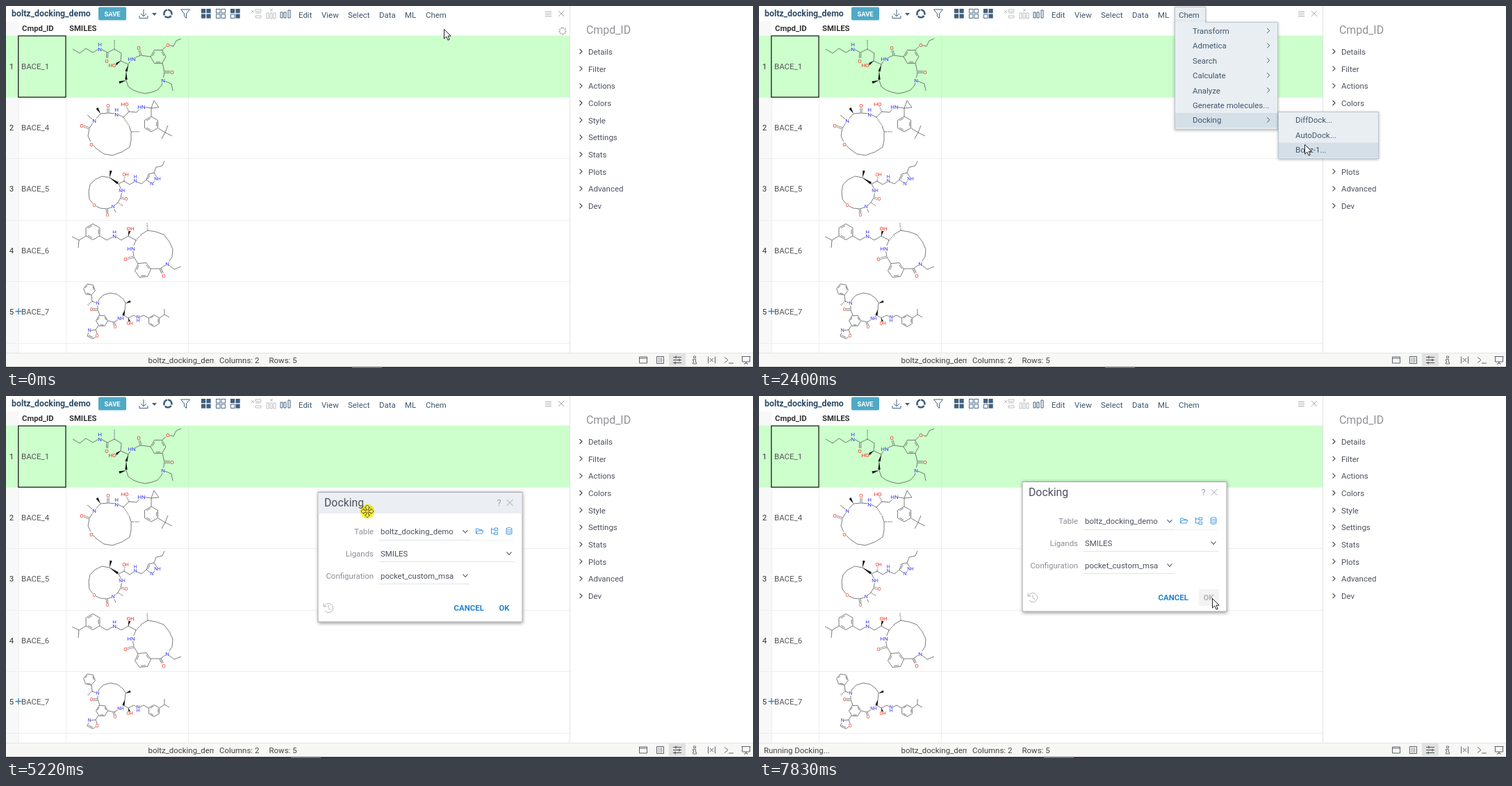
Animation of 1075 by 521 pixels, one loop 8 s. Source, as an HTML page with a canvas:

```html
<!DOCTYPE html>
<html lang="en">
<head>
<meta charset="utf-8">
<title>Docking demo</title>
<style>
html, body { margin: 0; width: 100%; height: 100%; overflow: hidden; background: #fff; }
canvas { display: block; }
</style>
</head>
<body>
<canvas id="stage" width="1075" height="521"></canvas>
<script>
const W = 1075, H = 521, LOOP = 8000;
const INK = '#4d5261', SLATE = '#40566c', BLUE = '#2083d5', GREY = '#9a9ea6', GREEN = '#ccffcc';
const screen = document.getElementById('stage').getContext('2d');
const backdrop = document.createElement('canvas');
backdrop.width = W;
backdrop.height = H;
let g = backdrop.getContext('2d');

function text(s, x, y, color = INK, size = 11.45, weight = 400, align = 'left') {
  g.font = `${weight} ${size}px Roboto, sans-serif`;
  g.textAlign = align;
  g.textBaseline = 'alphabetic';
  g.fillStyle = color;
  g.fillText(s, x, y + size * 0.355);
}
function rect(x, y, w, h, color) {
  g.fillStyle = color;
  g.fillRect(x, y, w, h);
}
function frame(x, y, w, h, color, width = 1) {
  g.strokeStyle = color;
  g.lineWidth = width;
  g.strokeRect(x, y, w, h);
}
function path(d, color, width = 1, fill) {
  const p = new Path2D(d);
  if (fill) { g.fillStyle = fill; g.fill(p); }
  if (color) { g.strokeStyle = color; g.lineWidth = width; g.stroke(p); }
}
// Path drawn around a local origin.
function icon(x, y, d, color, width = 1, fill) {
  g.save();
  g.translate(x, y);
  path(d, color, width, fill);
  g.restore();
}
function shadowBox(x, y, w, h, fill, border, blur, shade) {
  g.save();
  g.shadowColor = shade;
  g.shadowBlur = blur;
  g.shadowOffsetY = 1;
  rect(x, y, w, h, fill);
  g.restore();
  frame(x + 0.5, y + 0.5, w - 1, h - 1, border);
}
const CROSS = 'M-4-4L4 4M4-4L-4 4';
const DOWN = 'M-3.5-2L0 2L3.5-2';

/* ---- molecules ---- */
function hexagon([x, y, r, turn]) {
  const at = (i, k) => {
    const a = (turn + 60 * i) * Math.PI / 180;
    return [x + k * Math.cos(a), y + k * Math.sin(a)];
  };
  let d = '';
  for (let i = 0; i < 6; i++) {
    d += `M${at(i, r)}L${at(i + 1, r)}`;
    if (i % 2) d += `M${at(i + 0.12, r * 0.76)}L${at(i + 0.88, r * 0.76)}`;
  }
  return d;
}
function molecule({ bg = '#fff', size, bonds, double, wedge = [], hash = '', rings, atoms }) {
  const line = '#505050', thin = 0.75;
  path(bonds, line, thin);
  path(double, line, 2.8);
  path(double, bg, 1.4);
  rings.forEach(r => path(hexagon(r), line, thin));
  wedge.forEach(([x, y, u, v]) => {
    const n = Math.hypot(u - x, v - y), dx = (v - y) / n * 1.7, dy = (x - u) / n * 1.7;
    path(`M${x} ${y}L${u + dx} ${v + dy}L${u - dx} ${v - dy}Z`, null, 0, '#111');
  });
  g.setLineDash([0.8, 1.6]);
  path(hash, '#666', 2);
  g.setLineDash([]);
  for (const [s, x, y] of atoms) {
    const w = size * 0.68 * s.length;
    rect(x - w / 2, y - size * 0.48, w, size * 0.96, bg);
    text(s, x, y, /N|^H$/.test(s) ? '#3434f0' : '#f02a1c', size, 400, 'center');
  }
}
const molecules = [
  { bg: GREEN, size: 8,
    bonds: 'M96 62L106 68L115 61L125 67L135 61L146 67L156 62L166 68L165 79L176 84L173 95L173 107L176 116L183 121L191 124L200 126L210 124L218 121L224 114L226 107L228 95L225 82M176 84L181 76L194 71L208 73M165 79L154 85M226 107L238 112L240 122M224 64L233 56L241 58L245 50L252 47',
    double: 'M146 67L145 78M194 71L191 60M228 95L239 95', hash: 'M156 62L156 49',
    wedge: [[176, 85, 173, 94], [173, 95, 173, 106], [173, 107, 163, 110], [165, 79, 158, 84]],
    rings: [[219, 73, 11, 0]],
    atoms: [['H', 135, 55], ['N', 135, 62], ['O', 145, 79], ['HO', 153, 85], ['HN', 181, 76], ['O', 191, 60], ['O', 233, 56], ['O', 239, 95], ['N', 226, 107]] },
  { size: 8,
    bonds: 'M117 157L127 165L136 155L147 154L159 155L169 160L177 152L188 153L195 145L209 147L213 136L220 146L209 147L209 159M219 176L229 182L239 187M233 172L229 182L224 191M180 181L180 193L178 203L167 210L153 215L141 213L131 206L123 198L118 187L120 176L127 165M177 172L180 181',
    double: 'M147 154L147 143M120 176L109 172', wedge: [[136, 155, 131, 147]],
    hash: 'M177 152L173 144M169 160L177 172M181 181L193 181', rings: [[209, 170, 11, 30]],
    atoms: [['N', 127, 165], ['O', 147, 143], ['N', 159, 156], ['H', 159, 149], ['HO', 171, 141], ['HN', 195, 145], ['O', 109, 172], ['O', 123, 199]] },
  { size: 6.6,
    bonds: 'M162 256L149 247L138 245L128 250L121 257L119 267L120 278L127 287L136 291L145 292L154 289L161 283L165 276L167 266L162 256L170 252L178 257L186 252L195 256L202 250L205 242L213 240L218 248L210 256L202 250M204 249L207 243M154 289L158 297M213 240L216 232L225 230L228 223',
    double: 'M145 292L146 300M165 276L173 278', wedge: [[149, 247, 151, 237], [149, 247, 161, 255]],
    hash: 'M170 252L171 245M161 283L169 288', rings: [],
    atoms: [['OH', 172, 243], ['H', 186, 246], ['N', 186, 252], ['NH', 218, 249], ['N', 210, 256], ['NH', 167, 266], ['O', 173, 278], ['N', 154, 289], ['O', 127, 287], ['O', 146, 301]] },
  { size: 8,
    bonds: 'M95 332L105 337L104 348M105 337L115 331M135 331L145 337L156 331L166 337L176 331L187 337L182 349L184 361L190 371M176 331L178 321M194 329L204 323L216 325L227 329L235 339L240 350L239 361L232 371L222 378L208 378M232 371L242 379L252 375',
    double: 'M184 361L173 364M222 378L227 388', wedge: [[176, 331, 178, 323]],
    hash: 'M187 337L195 329M204 323L203 312', rings: [[125, 325, 11.5, 30], [197, 380, 11.5, -5]],
    atoms: [['H', 156, 325], ['N', 156, 331], ['OH', 179, 320], ['HN', 180, 349], ['O', 172, 364], ['N', 232, 371], ['O', 227, 388]] },
  { size: 6.6,
    bonds: 'M123 416L124 425L132 428L134 422L140 416L150 413L160 415L168 421L172 427L171 438L169 445L165 450L155 455L147 453M132 428L132 437L135 445M169 445L176 449L184 445L190 449L198 445L205 449M176 449L178 457M221 449L228 444L228 436M228 444L235 448M133 460L129 466L120 467L117 475L125 479L132 474L129 466M119 474L125 477',
    double: 'M132 437L123 437M155 455L157 462', wedge: [[172, 428, 179, 425], [171, 437, 169, 445], [176, 449, 178, 455]],
    hash: 'M124 425L117 431', rings: [[120, 408, 8.5, 10], [138, 453, 8.5, 0], [213, 453, 8.5, 30]],
    atoms: [['N', 132, 428], ['O', 123, 437], ['NH', 165, 450], ['O', 157, 462], ['OH', 178, 457], ['N', 190, 448], ['H', 190, 453], ['N', 120, 467], ['O', 131, 475]] }
];

/* ---- static screen ---- */
function toolbar() {
  text('boltz_docking_demo', 8, 11, '#2b4a66', 12.3, 700);
  g.beginPath();
  g.roundRect(133, 1.5, 40, 19, 2);
  g.fillStyle = '#50a9c5';
  g.fill();
  text('SAVE', 153, 11.3, '#fff', 9.4, 700, 'center');
  const c = '#40607f';
  icon(198, 11, 'M0-6V4M-4 0L0 4L4 0M-6 3V6.5H6V3', c);
  icon(213.5, 12, 'M-3.5-2H3.5L0 2Z', null, 0, c);
  g.setLineDash([10, 1.6]);
  icon(233, 11, 'M0-5.5A5.5 5.5 0 1 1-.1-5.5', c, 2.6);
  g.setLineDash([]);
  icon(258, 11, 'M-6.5-6H6.5L1.5 0V6.5L-1.5 4V0Z', c);
  const filled = ['1111', '0000', '1101'];
  filled.forEach((cells, n) => {
    for (let i = 0; i < 4; i++) {
      const x = 281.5 + 21 * n + 7.5 * (i % 2), y = 4.5 + 7.5 * (i >> 1);
      if (cells[i] === '1') rect(x - 0.5, y - 0.5, 6.2, 6.2, c);
      else frame(x, y, 5.5, 5.5, c, 0.9);
    }
  });
  icon(360, 11, 'M-1-6H7V-3H-1ZM-1-1H7M-1 3H7V6H-1ZM-7-5L-3-1M-3-5L-7-1', '#b4b7bb', 0.9);
  icon(381, 11, 'M-6-1H-3V7H-6ZM-1-1H2V7H-1ZM4-1H7V7H4ZM-1-7L3-3M3-7L-1-3', '#b4b7bb', 0.9);
  icon(402, 11, 'M-7-2H-4V6H-7ZM-2-2H1V6H-2ZM4-5H7V6H4Z', c);
  [['Edit', 421], ['View', 454], ['Select', 492], ['Data', 537], ['ML', 574], ['Chem', 604]]
    .forEach(([s, x]) => text(s, x, 12.5, SLATE));
  icon(780.5, 11, 'M-4.5-2.5H4.5M-4.5.5H4.5M-4.5 3.5H4.5', '#9b9fa5', 0.9);
  icon(799, 11, CROSS, '#9b9fa5', 0.9);
}
function grid() {
  rect(0, 22, 18, 477, '#f8f8f8');
  text('Cmpd_ID', 23, 32, '#333', 11.3, 700);
  text('SMILES', 91, 32, '#333', 11.3, 700);
  rect(0, 42.5, 811, 88.5, GREEN);
  for (let i = 1; i < 6; i++) rect(0, Math.round(42.6 + 88.4 * i), 811, 1, '#eeeeee');
  for (const x of [18, 86, 262]) {
    rect(x, 43, 1, 88, '#c4f2c4');
    rect(x, 131, 1, 368, '#eeeeee');
  }
  [1, 4, 5, 6, 7].forEach((id, i) => {
    const y = 87 + 88.2 * i;
    text(String(i + 1), 8, y, '#333', 11.45, 400, 'center');
    text('BACE_' + id, 22, y, '#555');
  });
  icon(18, 439.5, 'M-4.5 0H4.5M0-4.5V4.5', '#2f86c8', 1.3);
  frame(17.75, 43, 68.25, 88.25, '#222', 1.3);
  molecules.forEach(molecule);
}
function sidePanel() {
  rect(811, 0, 1, 499, '#e2e2e2');
  text('Cmpd_ID', 835, 34, '#8f9298', 15.9);
  'Details Filter Actions Colors Style Settings Stats Plots Advanced Dev'.split(' ').forEach((s, i) => {
    const y = 66 + 24.67 * i;
    icon(827, y - 0.5, 'M-1.5-3.5L2 0L-1.5 3.5', '#444', 1.1);
    text(s, 838, y, INK);
  });
}
function statusBar() {
  rect(0, 499, W, 20.5, '#f7f7f5');
  rect(0, 499, W, 1, '#e4e4e2');
  rect(0, 519.5, W, 1.5, '#1d1720');
  g.save();
  g.beginPath();
  g.rect(200, 500, 99, 18);
  g.clip();
  text('boltz_docking_demo', 204.5, 509.5, '#444');
  g.restore();
  text('Columns: 2', 307, 509.5, '#444');
  text('Rows: 5', 378.5, 509.5, '#444');
  rect(954, 500, 24, 18, '#e2e2e0');
  const c = '#4f555e';
  icon(917, 509.5, 'M-5.5-4.5H5.5V4.5H-5.5ZM-5.5-2.5H5.5', c, 0.9);
  icon(941.5, 509.5, 'M-5-5H5V5H-5ZM-3-2.5H-1M0-2.5H3M-3 0H-1M0 0H3M-3 2.5H-1M0 2.5H3', c, 0.9);
  icon(966, 509.5, 'M-6-4H6M-6 0H6M-6 4H6M-2-6V-2M3-2V2M-3 2V6', c, 1.1);
  icon(991, 509.5, 'M-1.5-5.5H1.5V-3H-1.5ZM-2.5-1H1.5V3.5H2.5V5.5H-2.5V3.5H-1.5V1H-2.5Z', c, 0.8);
  icon(1015.5, 509.5, 'M-5-5V5M5-5V5M-2.5-2.5L2.5 2.5M2.5-2.5L-2.5 2.5', c, 0.9);
  icon(1040, 509.5, 'M-6-4L-1 0L-6 4M0 4.5H7', c, 0.9);
  icon(1065, 509.5, 'M-6.5-5H6.5M-5.5-5V2.5H5.5V-5M0 2.5V5.5M-3 6L0 4L3 6', c, 0.9);
}
rect(0, 0, W, H, '#fff');
toolbar();
grid();
sidePanel();
statusBar();
g = screen;

/* ---- motion ---- */
// Each move: start, end, number of steps, evenly spaced points.
const cursorMoves = [
  [60, 800, 12, [[630, 33], [622, 21], [618, 15], [619, 20], [626, 60], [634, 96], [640, 122]]],
  [880, 1130, 5, [[640, 122], [648, 135], [648, 143], [648, 150], [647, 156], [646, 158]]],
  [1450, 2190, 12, [[646, 158], [695, 163], [745, 166], [774, 179], [788, 200]]],
  [2320, 2400, 2, [[788, 200], [785, 199]]],
  [3660, 3810, 3, [[785, 199], [823, 199], [831, 202], [834, 204]]],
  [6170, 6940, 12, [[450, 151], [480, 170], [540, 212], [602, 253], [645, 287], [661, 293]]],
  [7020, 7350, 6, [[661, 293], [654, 291], [649, 290], [652, 291]]]
];
const dialogMoves = [
  [4470, 5220, 11, [[763, 177], [757, 181], [735, 185], [695, 180], [645, 172], [596, 164], [550, 155], [510, 145], [482, 137], [463, 132], [453, 135], [449, 138]]],
  [5290, 5770, 8, [[449, 138], [432, 134], [415, 129], [400, 126], [390, 124], [384, 123], [381, 123], [380, 123], [379, 123]]]
];
const presses = [[2850, 2980], [4000, 4270], [4470, 5770], [7550, 7690]];

function locate(moves, t) {
  let spot = moves[0][3][0];
  for (const [start, end, steps, pts] of moves) {
    if (t < start) break;
    const k = Math.floor((Math.min(t, end) - start) / (end - start) * (steps - 1) + 0.1);
    const u = (k + 1) / steps * (pts.length - 1);
    const i = Math.min(Math.floor(u + 1e-6), pts.length - 2), f = u - i;
    spot = [0, 1].map(a => Math.round(pts[i][a] + (pts[i + 1][a] - pts[i][a]) * f));
  }
  return spot;
}

/* ---- moving parts ---- */
const MENU_BG = '#e9eef3', HOVER = '#d5dfe8', EDGE = '#bcc6d0', SHADE = 'rgba(0,0,0,.3)';
function gear() {
  g.setLineDash([2, 1.5]);
  icon(801, 36, 'M0-5A5 5 0 1 1-.1-5', '#b0b0b0', 1.4);
  g.setLineDash([]);
  icon(801, 36, 'M0-4A4 4 0 1 1-.1-4', '#b0b0b0', 0.8);
}
function menu(t, cx, cy) {
  const items = ['Transform', 'Admetica', 'Search', 'Calculate', 'Analyze', 'Generate molecules...', 'Docking'];
  const subOpen = t >= 1060;
  const active = subOpen ? 6 : Math.floor((cy - 25.3) / 21.4);
  shadowBox(598, 1, 45, 24, MENU_BG, EDGE, 3, SHADE);
  shadowBox(598, 23, 149, 155, MENU_BG, EDGE, 4, SHADE);
  rect(599, 22, 43, 3, MENU_BG);
  text('Chem', 604, 12.5, SLATE);
  items.forEach((s, i) => {
    const y = 36 + 21.4 * i;
    if (i === active) rect(599, y - 10.5, 147, 21.4, HOVER);
    text(s, 624, y, SLATE);
    if (i !== 5) icon(733, y - 0.5, 'M-1.8-3.5L1.8 0L-1.8 3.5', SLATE);
  });
  if (!subOpen) return;
  shadowBox(747, 152, 145, 68, MENU_BG, EDGE, 4, SHADE);
  const over = cx >= 747 ? Math.floor((cy - 153.5) / 21.4) : -1;
  ['DiffDock...', 'AutoDock...', 'Boltz-1...'].forEach((s, i) => {
    const y = 164.3 + 21.4 * i;
    if (i === over) rect(748, y - 10.5, 143, 21.4, HOVER);
    text(s, 772, y, SLATE);
  });
}
function dialog(x, y, hover, disabled) {
  g.save();
  g.translate(x, y);
  shadowBox(-0.5, 0, 295, 187.5, '#fff', '#a2a5a9', 5, 'rgba(0,0,0,.45)');
  if (hover) rect(0.5, 1, 293, 30, '#ebeef2');
  text('Docking', 9, 15.5, INK, 15.8);
  text('?', 260.5, 15.5, GREY, 13, 400, 'center');
  icon(276, 15.5, 'M-4.5-4.5L4.5 4.5M4.5-4.5L-4.5 4.5', GREY, 0.9);
  [['Table', 'boltz_docking_demo', 57, 219], ['Ligands', 'SMILES', 88.5, 282], ['Configuration', 'pocket_custom_msa', 120.5, 219]]
    .forEach(([label, value, cy, right]) => {
      text(label, 80, cy, '#8b8f98', 11.45, 400, 'right');
      text(value, 90, cy, INK);
      rect(87, Math.round(cy + 11.5), right - 87, 1, '#e2e4e7');
      icon(right - 7, cy, DOWN, '#444a55', 1.1);
    });
  rect(219, 69, 63, 1, '#f0f1f3');
  icon(232.5, 56.5, 'M-5 3.5V-3.5H-1.5L-.5-2H3.5V-.5M-5 3.5L-3-.5H5.5L3.5 3.5Z', BLUE, 0.8);
  icon(254, 56.5, 'M-4.5-5V3.5H0M-4.5-2.5H0M0-4.5H4.5V-1H0ZM0 1.5H4.5V5H0Z', BLUE, 0.8);
  icon(275, 56.5, 'M-4-3.5A4 1.5 0 0 1 4-3.5V3.5A4 1.5 0 0 1-4 3.5ZM-4-3.5A4 1.5 0 0 0 4-3.5M-4-1A4 1.5 0 0 0 4-1M-4 1.5A4 1.5 0 0 0 4 1.5', BLUE, 0.7);
  icon(15, 167, 'M-6-2A6.5 6.5 0 1 1-5 4M-7-6.5V-2H-2.5M0-4V.5L3 2.5', '#a9adb3', 0.9);
  text('CANCEL', 195.5, 167, BLUE, 11.45, 700);
  if (disabled) rect(254, 155, 29, 24, '#f3f3f3');
  text('OK', 268, 167, disabled ? '#b4b4b4' : BLUE, 11.45, 700, 'center');
  g.restore();
}
function cursor(kind, x, y) {
  if (kind === 'move') {
    g.save();
    g.translate(x, y);
    for (let i = 0; i < 4; i++) {
      path('M0-9L4-5.2H1.6V-2.2H-1.6V-5.2H-4Z', '#505050', 0.8, '#fff');
      g.rotate(Math.PI / 2);
    }
    g.restore();
  } else if (kind === 'hand') {
    icon(x, y, 'M-1.5 10V1Q0-1 1.5 1V6L7 7.5Q9 8 8.5 11L7 17H-.5L-5.5 11Q-6 8.5-3.5 9Z', '#222', 1, '#fff');
  } else {
    icon(x, y, 'M.5.5V14L3.7 11L6 16.2L8.2 15.2L6 10.2H10.2Z', '#222', 1, '#fff');
  }
}
// The click highlight tints whatever lies under it, pointer included.
function highlight(x, y) {
  g.save();
  g.globalCompositeOperation = 'multiply';
  g.beginPath();
  g.arc(x, y, 10.3, 0, 7);
  g.fillStyle = '#fbf23c';
  g.fill();
  g.restore();
}

function draw(t) {
  const [dx, dy] = locate(dialogMoves, t);
  const dragging = t >= 4470 && t < 6170;
  const lag = t >= 4540 && t < 5150 ? 9 : 0;
  const [cx, cy] = dragging ? [dx + 71 - lag, dy + 28] : locate(cursorMoves, t);
  const hasMenu = t >= 340 && t < 3130, hasDialog = t >= 3330, disabled = t >= 7760;
  const inHeader = hasDialog && cy < dy + 31;
  const onOk = hasDialog && !disabled && cx >= dx + 254 && cy >= dy + 155;

  g.drawImage(backdrop, 0, 0);
  rect(t < 2910 ? 498 : 410, 519.5, 43, 1.5, '#77727a');
  if (!hasMenu && !hasDialog && cy > 22) gear();
  if (t >= 7830) text('Running Docking...', 7, 510, '#444');
  if (hasMenu) menu(t, cx, cy);
  if (hasDialog) dialog(dx, dy, inHeader, disabled);
  cursor(inHeader ? 'move' : onOk ? 'hand' : 'arrow', cx, cy);
  if (presses.some(([a, b]) => t >= a && t < b)) highlight(cx, cy);
}

const begin = performance.now();
function tick() {
  draw((performance.now() - begin) % LOOP);
  requestAnimationFrame(tick);
}
tick();
</script>
</body>
</html>
```
